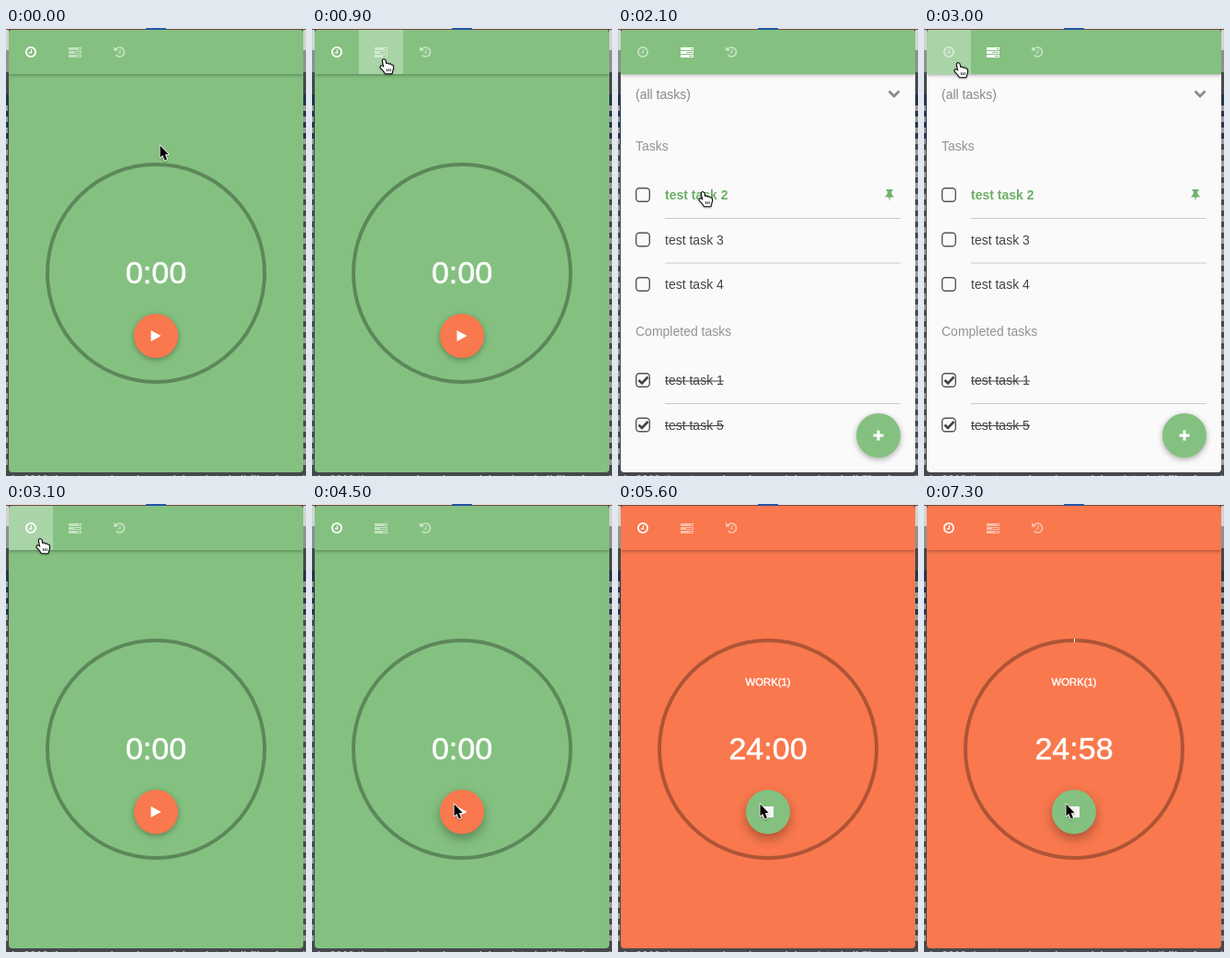
These frames come from a looping animation (326 by 486 pixels, 7400 ms). An HTML page with a canvas:

```html
<!DOCTYPE html>
<html lang="en">
<head>
<meta charset="utf-8">
<title>Timer</title>
<style>
  html, body { margin: 0; width: 100%; height: 100%; overflow: hidden; background: #46484b; }
  canvas { display: block; width: 326px; height: 486px; }
</style>
</head>
<body>
<canvas id="stage" width="326" height="486"></canvas>
<script>
const ctx = document.getElementById('stage').getContext('2d');
const LOOP = 7400, STEP = 100;
const GREEN = '#84c180', ORANGE = '#f9784d', PAPER = '#fafafa';
const SANS = '"Liberation Sans", Arial, sans-serif';
const SHOW_TASKS = 1100, PIN_TASK = 2100, SHOW_TIMER = 3100, START = 4800;

// time, x, y of the pointer tip
const POINTER = [
  [0, 167, 127], [100, 167, 127], [900, 78, 34], [1200, 77, 33], [1400, 77, 33],
  [1900, 92, 178], [2300, 92, 178], [2900, 37, 38], [3200, 37, 38], [4000, 154, 325]
];

const clamp = v => Math.max(0, Math.min(1, v));
const ease = v => v * v * (3 - 2 * v);

function pointerAt(t) {
  const i = POINTER.findIndex(k => k[0] > t);
  if (i < 0) return POINTER[POINTER.length - 1].slice(1);
  const [t0, x0, y0] = POINTER[i - 1], [t1, x1, y1] = POINTER[i];
  const k = ease((t - t0) / (t1 - t0));
  return [x0 + (x1 - x0) * k, y0 + (y1 - y0) * k];
}

function rect(x, y, w, h, color) {
  ctx.fillStyle = color;
  ctx.fillRect(x, y, w, h);
}

function path(points, close) {
  ctx.beginPath();
  points.forEach(([x, y]) => ctx.lineTo(x, y));
  if (close) ctx.closePath();
}

function line(points, color, width) {
  path(points);
  ctx.strokeStyle = color;
  ctx.lineWidth = width;
  ctx.stroke();
}

function arc(x, y, r, from, to, color, width) {
  ctx.beginPath();
  ctx.arc(x, y, r, from, to);
  ctx.strokeStyle = color;
  ctx.lineWidth = width;
  ctx.stroke();
}

function text(str, x, y, color, size = 14, { weight = 'normal', align = 'left', thicken = 0 } = {}) {
  ctx.font = `${weight} ${size}px ${SANS}`;
  ctx.textAlign = align;
  ctx.fillStyle = color;
  ctx.fillText(str, x, y);
  if (thicken) {
    ctx.strokeStyle = color;
    ctx.lineWidth = thicken;
    ctx.strokeText(str, x, y);
  }
}

function withShadow(alpha, blur, dy, draw) {
  ctx.save();
  ctx.shadowColor = `rgba(0,0,0,${alpha})`;
  ctx.shadowBlur = blur;
  ctx.shadowOffsetY = dy;
  draw();
  ctx.restore();
}

function roundButton(x, y, color, raised) {
  withShadow(0.32, raised ? 12 : 6, raised ? 5 : 2, () => {
    ctx.beginPath();
    ctx.arc(x, y, 24, 0, Math.PI * 2);
    ctx.fillStyle = color;
    ctx.fill();
  });
}

// Slivers of the page showing around the panel
function backdrop() {
  rect(0, 0, 326, 486, '#46484b');
  rect(0, 0, 326, 1, '#eee8e6');
  rect(0, 1, 326, 1, '#6b4a48');
  rect(152, 0, 22, 2, '#2455a4');
  for (const x of [0, 323]) {
    rect(x, 2, 3, 22, '#d2d2d2');
    rect(x, 24, 3, 24, '#8e9092');
    rect(x, 72, 3, 54, '#27344c');
    for (let y = 84; y < 480; y += 12) rect(x, y, x ? 3 : 2, 6, '#9a9b9c');
  }
  text('is 2013 the atmosphere is good, I updated all files found', 6, 494, '#b4b4b4', 12, { weight: 'bold' });
}

function clockIcon(x, y, color) {
  arc(x, y, 5.1, 0, Math.PI * 2, color, 1.8);
  line([[x + 0.5, y - 3], [x + 0.5, y + 0.8], [x - 2.2, y + 0.8]], color, 1.2);
}

function tasksIcon(x, y, color, ground) {
  [[-5, 4], [-1, -1], [3, 2]].forEach(([dy, notch]) => {
    rect(x - 7, y + dy, 14, 3, color);
    rect(x + notch, y + dy + 1, 6 - notch, 1, ground);
  });
}

function historyIcon(x, y, color) {
  arc(x + 0.5, y, 5, -Math.PI * 0.85, Math.PI * 0.78, color, 1.7);
  path([[x - 6, y - 6], [x - 6, y - 1.2], [x - 1.2, y - 1.2]], true);
  ctx.fillStyle = color;
  ctx.fill();
  line([[x + 1, y - 3], [x + 1, y + 1], [x - 1.5, y + 1]], color, 1.2);
}

function header(color, active, hovered) {
  withShadow(0.35, 4, 1, () => rect(3, 2, 320, 48, color));
  if (hovered >= 0) rect(3 + hovered * 48, 2, 48, 48, 'rgba(255,255,255,.3)');
  const tint = i => i === active ? '#fff' : 'rgba(255,255,255,.52)';
  clockIcon(27, 26, tint(0));
  tasksIcon(75, 26, tint(1), color);
  historyIcon(123, 26, tint(2));
}

function timerView(t, overButton) {
  const running = t >= START;
  rect(3, 2, 320, 480, running ? ORANGE : GREEN);
  arc(163, 266, 118, 0, Math.PI * 2, 'rgba(0,0,0,.3)', 4);

  let label = '0:00';
  if (running) {
    const ticks = Math.floor((t - START) / 1000);
    label = ticks ? '24:' + (60 - ticks) : '24:00';
    const slide = ease(clamp(((t - START) % 1000) / 500));
    const elapsed = ticks ? ticks - 1 + slide : 0;
    if (elapsed > 0) {
      const top = -Math.PI / 2;
      arc(163, 266, 118, top, top + Math.PI * 2 * elapsed / 1500, '#fff', 4);
    }
    text('WORK(1)', 163, 197, '#fff', 11.3, { align: 'center', thicken: 0.4 });
  }
  text(label, 163, 277, '#fff', 34, { align: 'center', thicken: 0.5 });

  roundButton(163, 334, running ? GREEN : ORANGE, overButton);
  if (running) {
    rect(157, 328, 12, 12, '#f4f4f4');
  } else {
    path([[157.5, 328], [168.5, 334], [157.5, 340]], true);
    ctx.fillStyle = '#fff';
    ctx.fill();
  }
}

function checkbox(y, checked) {
  ctx.beginPath();
  ctx.roundRect(19.7, y - 7.3, 14.6, 14.6, 3.5);
  ctx.strokeStyle = '#555';
  ctx.lineWidth = 1.4;
  ctx.stroke();
  if (checked) line([[22.5, y], [26, y + 3.5], [32.5, y - 3.5]], '#444', 2.6);
}

function pin(x, y) {
  rect(x - 3.5, y - 6, 7, 1.8, '#72b26c');
  rect(x - 2.3, y - 5, 4.6, 6, '#72b26c');
  path([[x - 2.3, y - 1], [x + 2.3, y - 1], [x + 5, y + 2.4], [x - 5, y + 2.4]], true);
  ctx.fill();
  path([[x - 0.9, y + 2], [x + 0.9, y + 2], [x, y + 7]], true);
  ctx.fill();
}

function taskRow(name, y, { done = false, pinned = false, rule = false } = {}) {
  checkbox(y, done);
  if (pinned) {
    text(name, 51, y + 5, '#6dae67', 14, { weight: 'bold' });
    pin(295, y);
  } else {
    text(name, 51, y + 5, '#444');
  }
  if (done) rect(51, y + 0.5, 64, 1, '#444');
  if (rule) rect(51, y + 25, 256, 1, '#cbcbcb');
}

function tasksView(t) {
  rect(3, 2, 320, 480, PAPER);
  text('(all tasks)', 19, 77, '#888');
  line([[294.5, 68.5], [300, 74], [305.5, 68.5]], '#8a8a8a', 2.8);
  text('Tasks', 19, 133, '#929292');
  taskRow('test task 2', 181, { pinned: t >= PIN_TASK, rule: true });
  taskRow('test task 3', 229.5, { rule: true });
  taskRow('test task 4', 278);
  text('Completed tasks', 19, 334, '#929292');
  taskRow('test task 1', 382, { done: true, rule: true });
  taskRow('test task 5', 430.5, { done: true });
  roundButton(283, 442, GREEN, false);
  rect(277.5, 440.5, 11, 3, '#fff');
  rect(281.5, 436.5, 3, 11, '#fff');
}

function cursorShape(fill, edge, width) {
  withShadow(0.3, 2, 1, () => {
    ctx.lineJoin = 'round';
    ctx.strokeStyle = edge;
    ctx.lineWidth = width;
    ctx.stroke();
  });
  ctx.fillStyle = fill;
  ctx.fill();
}

function arrow() {
  path([[0.5, 0.5], [0.5, 13.5], [3.3, 11], [5.6, 16.4], [8, 15.4], [5.8, 10.2], [9.6, 10]], true);
  cursorShape('#000', '#fff', 1.8);
}

function hand() {
  path([[-1.2, 1], [0, 0], [1.5, 1], [2.3, 5], [4.5, 4.6], [5.3, 5.7], [7.2, 5.3], [8, 6.4],
        [9.6, 6.6], [10.2, 9], [9.4, 12], [8.6, 15.2], [1.8, 15.2], [0, 12.4],
        [-3.6, 8.6], [-3, 7.2], [-1.4, 7.6], [0.3, 9]], true);
  cursorShape('#fff', '#000', 2);
  line([[3.3, 10.2], [3.6, 13]], '#000', 0.8);
  line([[5.3, 10.2], [5.4, 13]], '#000', 0.8);
  line([[7.3, 10.2], [7.2, 13]], '#000', 0.8);
}

function draw(t) {
  const [x, y] = pointerAt(t);
  const onTasks = t >= SHOW_TASKS && t < SHOW_TIMER;
  const hovered = y < 50 && x < 147 ? Math.floor((x - 3) / 48) : -1;
  const overRow = onTasks && y > 157;

  backdrop();
  ctx.save();
  ctx.beginPath();
  ctx.roundRect(3, 2, 320, 480, 4);
  ctx.clip();
  if (onTasks) tasksView(t);
  else timerView(t, Math.hypot(x - 163, y - 334) < 24);
  header(t >= START ? ORANGE : GREEN, onTasks ? 1 : 0, hovered);
  ctx.restore();

  ctx.save();
  ctx.translate(x, y);
  if (hovered >= 0 || overRow) hand();
  else arrow();
  ctx.restore();
}

function frame() {
  const t = performance.now() % LOOP;
  draw(Math.floor(t / STEP) * STEP);
  requestAnimationFrame(frame);
}
frame();
</script>
</body>
</html>
```
